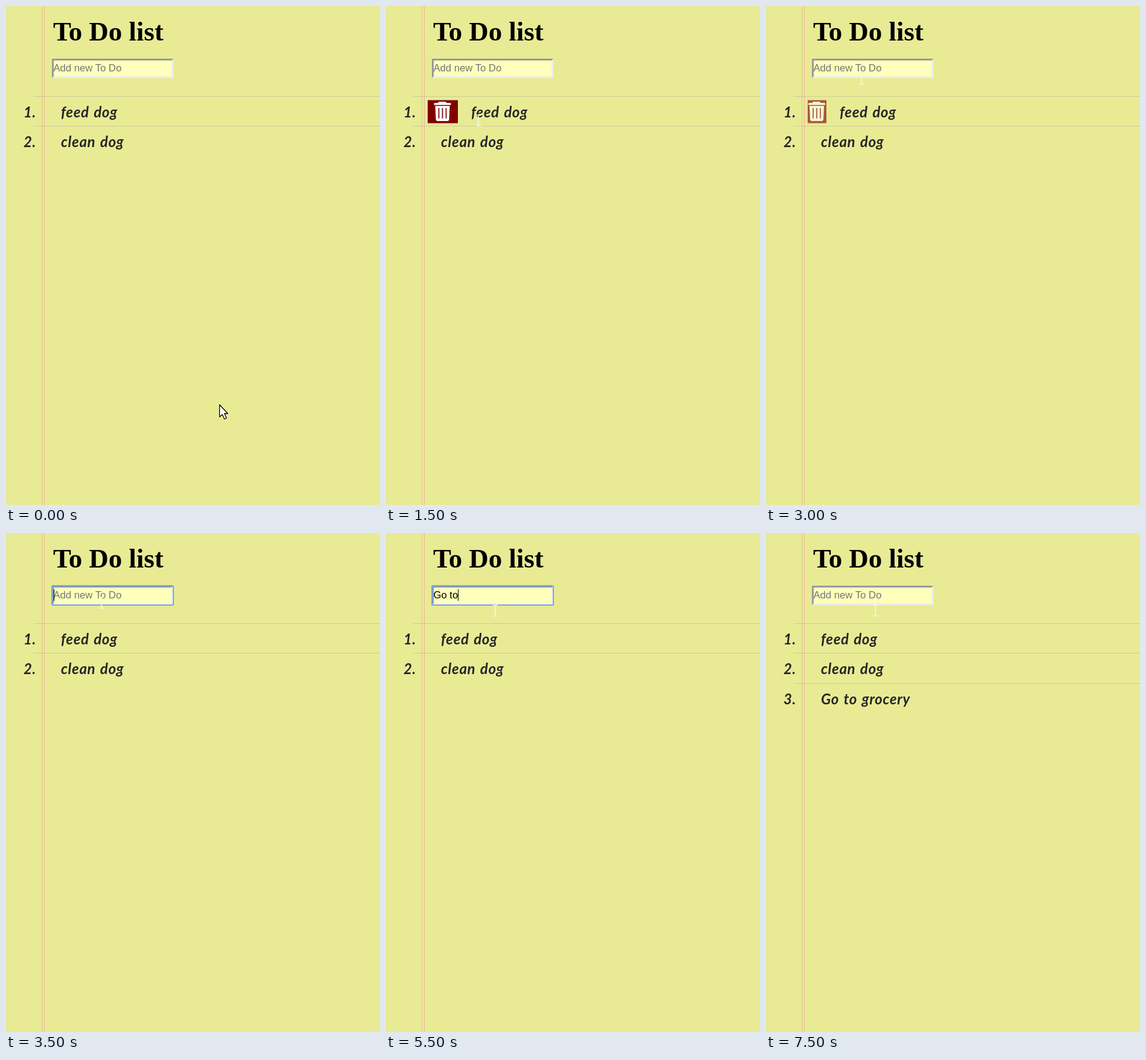
An HTML page for the animation above (8 s loop, 619 px wide and 824 px high).

```html
<!DOCTYPE html>
<html lang="en">
<head>
<meta charset="utf-8">
<title>To Do list</title>
<style>
  html, body { margin: 0; width: 100%; height: 100%; overflow: hidden; background: #e8eb94; }
  svg { display: block; width: 619px; height: 824px; }
  text { white-space: pre; }
  .title { font: bold 44.8px "Liberation Serif", serif; }
  .field { font: 16.66px "Liberation Sans", sans-serif; }
  .hand { font: italic bold 24px Lato, sans-serif; letter-spacing: .7px; word-spacing: 1.5px; fill: #252525; }
  .number { text-anchor: end; }
  .rule { stroke: #b3ae9c; stroke-dasharray: 1 1; }
  .margin { stroke: #f1b69b; }
</style>
</head>
<body>
<svg viewBox="0 0 619 824">
  <defs>
    <g id="bin">
      <path fill="#fff" d="M-14 4.500q0-1.500 1.500-1.500h5l1.500-2h11l1.500 2h6q1.500 0 1.500 1.500v2h-28z
        M-12 8h24l-1 22q-.2 3-3 3h-16q-2.800 0-3-3z"/>
      <path stroke="#800000" stroke-width="1.700" stroke-linecap="round" d="M-6 12v16M0 12v16M6 12v16"/>
    </g>
  </defs>
  <rect width="619" height="824" fill="#e8eb94"/>
  <path class="margin" d="M59.500 0v824M63.500 0v824"/>
  <text class="title" x="78" y="57">To Do list</text>

  <rect x="76" y="87" width="201" height="32" fill="#ffffbc"/>
  <path fill="#eeeeee" d="M277 87v32H76l3-3h195V90z"/>
  <path id="shade" d="M76 119V87h201l-3 3H79v26z"/>
  <rect id="ring" x="76" y="87" width="201" height="32" rx="1.500" fill="none" stroke="#78a7ea" stroke-width="2"/>
  <text id="hint" class="field" x="78.500" y="108" fill="#757575">Add new To Do</text>
  <text id="entry" class="field" x="78.500" y="108"></text>
  <path id="caret" stroke="#000" d="M.5 93v19"/>

  <g id="list"></g>

  <path id="beam" fill="none" stroke="#f6f6e2" stroke-width="1.700" d="M-4-9h3l1 1 1-1h3M0-8.500v17M-4 9h3l1-1 1 1h3"/>
  <path id="arrow" fill="#fff" stroke="#000" stroke-width="1.300" stroke-linejoin="round"
    d="M.5.5v20l4.500-4 3.500 7.500 3.500-1.500-3.500-7.500h5.500z"/>
</svg>
<script>
const LOOP = 8000;
const byId = id => document.getElementById(id);
const show = (node, on) => node.setAttribute("visibility", on ? "visible" : "hidden");
const place = (node, x, y) => node.setAttribute("transform", `translate(${x} ${y})`);

const items = ["feed dog", "clean dog", "Go to grocery"].map((label, i) => {
  const node = document.createElementNS(byId("list").namespaceURI, "g");
  const top = 149 + Math.floor(i * 49.5);
  place(node, 0, top);
  node.innerHTML = `
    <path class="rule" d="M46 .5h573"/>
    <text class="hand number" x="50" y="35">${i + 1}.</text>
    <g class="remove"><rect x="69" y="6.500" width="50" height="38" fill="#800000"/><use href="#bin"/></g>
    <text class="hand label" x="91" y="35">${label}</text>`;
  byId("list").append(node);
  return node;
});

// Each step changes only the listed properties; open holds each item's reveal, 0 to 1.
const steps = [
  { at: 0, pointer: "arrow", x: 353, y: 658, open: [0, 0], text: "", caret: false, focus: false, count: 2 },
  { at: 250, x: 292, y: 440 },
  { at: 500, pointer: "beam", x: 175, y: 228, open: [0, 1] },
  { at: 750, x: 152, y: 46, open: [0, 0] },
  { at: 1000, x: 151, y: 119 },
  { at: 1250, x: 152, y: 172, open: [1, 0] },
  { at: 1500, x: 153, y: 189 },
  { at: 1750, x: 154, y: 222, open: [.3, .7] },
  { at: 2000, x: 154, y: 246, open: [0, 1] },
  { at: 2500, x: 155, y: 220 },
  { at: 2750, x: 157, y: 170, open: [1, 0] },
  { at: 3000, x: 158, y: 120, open: [.62, 0] },
  { at: 3250, x: 158, y: 115, open: [0, 0] },
  { at: 3500, focus: true, caret: true },
  { at: 3750, x: 172, y: 122 },
  { at: 4000, x: 181, y: 128, caret: false },
  { at: 4500, text: "G", caret: true },
  { at: 4750, text: "Go" },
  { at: 5000, text: "Go " },
  { at: 5250, text: "Go t" },
  { at: 5500, text: "Go to" },
  { at: 5750, text: "Go to g" },
  { at: 6000, text: "Go to gro" },
  { at: 6250, text: "Go to grocer" },
  { at: 6750, text: "Go to grocery" },
  { at: 7000, text: "", count: 3 },
  { at: 7250, caret: false },
  { at: 7500, focus: false }
];
const states = [];
for (const step of steps) states.push({ ...states.at(-1), ...step });

function drawItem(node, open) {
  const remove = node.querySelector(".remove");
  remove.setAttribute("opacity", open);
  remove.firstChild.setAttribute("width", 50 * open);
  show(remove, open > 0);
  place(remove.lastChild, 68.5 + 25 * open, 8);
  node.querySelector(".label").setAttribute("x", 91 + 50 * open);
}

function draw(state) {
  for (const id of ["arrow", "beam"]) {
    show(byId(id), id === state.pointer);
    place(byId(id), state.x, state.y);
  }
  items.forEach((node, i) => {
    node.setAttribute("display", i < state.count ? "inline" : "none");
    drawItem(node, state.open[i] || 0);
  });
  const entry = byId("entry");
  entry.textContent = state.text;
  show(byId("hint"), !state.text);
  show(byId("ring"), state.focus);
  byId("shade").setAttribute("fill", state.focus ? "#8797ad" : "#9a9a9a");
  show(byId("caret"), state.caret);
  place(byId("caret"), Math.round(78.5 + (state.text ? entry.getComputedTextLength() : 0)), 0);
}

let current;
function tick() {
  const time = performance.now() % LOOP;
  const state = states.findLast(s => s.at <= time);
  if (state !== current) draw(current = state);
  requestAnimationFrame(tick);
}
tick();
</script>
</body>
</html>
```
